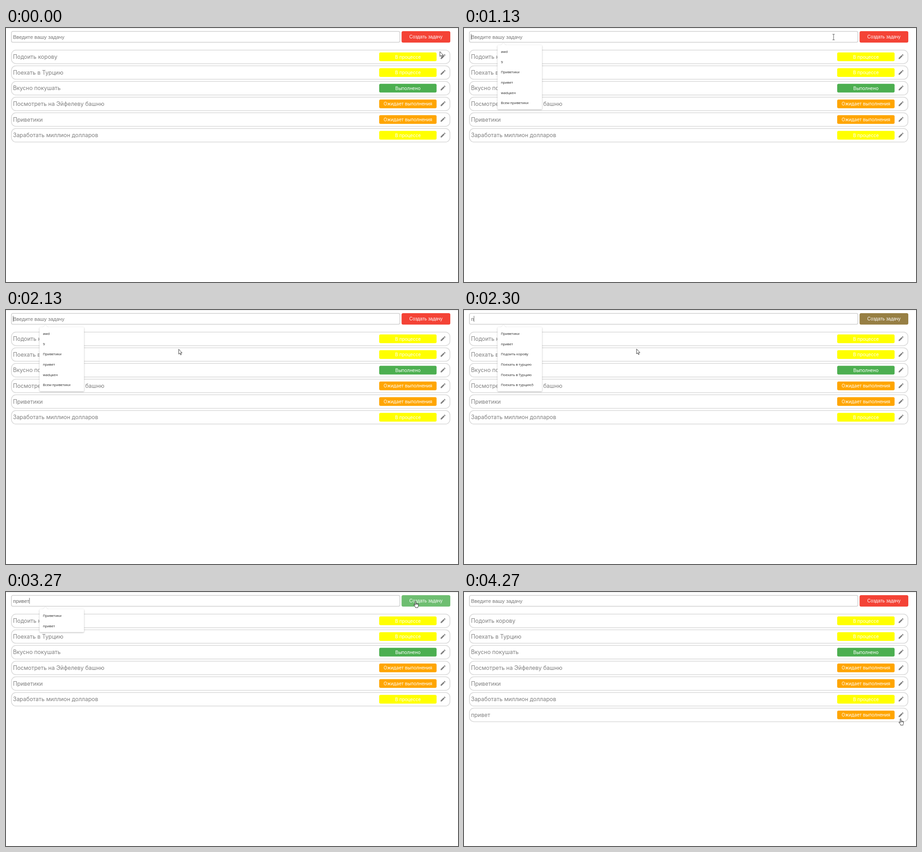
Recreate the animation shown at these times as an HTML page with a canvas. Size 998 px wide and 561 px high, loop 4400 ms.

```html
<!DOCTYPE html>
<html lang="ru">
<head>
<meta charset="utf-8">
<title>Список задач</title>
<style>
html, body { margin: 0; width: 100%; height: 100%; overflow: hidden; background: #fff; }
canvas { display: block; width: 998px; height: 561px; }
</style>
</head>
<body>
<canvas id="stage" width="998" height="561"></canvas>
<script>
const ctx = document.getElementById('stage').getContext('2d');
const LOOP = 4400;
const ARIAL = '"Liberation Sans", Arial, sans-serif';
const INTER = 'Inter, sans-serif';
const POPUP = '"Open Sans", sans-serif';
const RED = [244, 67, 54], GREEN = [76, 175, 80];

const STATUS = {
  progress: ['В процессе', '#ffff00'],
  done: ['Выполнено', '#4caf50'],
  waiting: ['Ожидает выполнения', '#ffa500']
};
const TASKS = [
  ['Подоить корову', 'progress'],
  ['Поехать в Турцию', 'progress'],
  ['Вкусно покушать', 'done'],
  ['Посмотреть на Эйфелеву башню', 'waiting'],
  ['Приветики', 'waiting'],
  ['Заработать миллион долларов', 'progress'],
  ['привет', 'waiting']
];
// Suggestions by number of typed letters; later entries reuse the last list.
const HINTS = [
  ['awd', '9', 'Приветики', 'привет', 'wadцкен', 'Всем приветики'],
  ['Приветики', 'привет', 'Подоить корову', 'Поехать в турцию', 'Поехать в Турцию', 'Поехать в турцию5'],
  ['Приветики', 'привет']
];

const WORD = 'привет';
const KEYS = [2200, 2400, 2530, 2720, 2850, 2980];
const FOCUS = 900, BLUR = 3430, SUBMIT = 3590;

// Pointer stops: time, x, y
const PATH = [
  [0, 958, 52], [280, 896, 98], [560, 829, 44], [630, 829, 41],
  [800, 816, 20], [1400, 816, 20], [1670, 456, 88], [1830, 392, 104],
  [2170, 381, 86], [2350, 381, 86], [2600, 912, 22], [3200, 912, 23],
  [3270, 904, 20], [3430, 904, 20], [3730, 916, 249], [3930, 952, 276],
  [4270, 964, 279.5]
];

const PENCIL = new Path2D('M3 17.25V21h3.75L17.81 9.94l-3.75-3.75zM20.71 7.04a1 1 0 0 0 0-1.41l-2.34-2.34a1 1 0 0 0-1.41 0l-1.83 1.83 3.75 3.75z');
const ARROW = new Path2D('M0 0V16L3.6 12.8 6.2 18.6 8.6 17.5 6.1 12H11Z');
const HAND = new Path2D('M-1.5 14V2a1.5 1.5 0 0 1 3 0V8.3q1.5-1.2 3 .3 1.6-1 2.8.5 2.2-.6 2.2 1.5v4.5q0 2-1.5 4V21.5H0V19.5L-5.3 13.2q-.8-1.8 1-2 1 0 2.8 2.8Z');

const clamp = v => Math.max(0, Math.min(1, v));
const mix = (a, b, k) => a + (b - a) * k;
const smooth = p => p * p * (3 - 2 * p);
const easeOut = p => 1 - (1 - p) ** 2;
const fade = (t, start, length) => easeOut(clamp((t - start) / length));
const rowCenter = i => 63.7 + i * 34.63;

function text(str, x, y, font, color, align = 'left') {
  ctx.font = font;
  ctx.fillStyle = color;
  ctx.textAlign = align;
  ctx.fillText(str, x, y);
}

function box(x, y, w, h, r, fill, stroke) {
  ctx.beginPath();
  ctx.roundRect(x, y, w, h, r);
  if (fill) { ctx.fillStyle = fill; ctx.fill(); }
  if (stroke) { ctx.strokeStyle = stroke; ctx.lineWidth = 1.5; ctx.stroke(); }
}

function drawRow([title, status], i) {
  const cy = rowCenter(i);
  const [label, color] = STATUS[status];
  box(12, cy - 14.9, 968.2, 29.9, 10, null, '#d9d9d9');
  text(title, 15.5, cy + 4.5, '12.4px ' + INTER, '#808080');
  box(824, cy - 9.6, 126.7, 19.2, 3, color);
  text(label, 887.4, cy + 3.8, '10.1px ' + INTER, '#fff', 'center');

  ctx.save();
  ctx.translate(965, cy - 0.5);
  ctx.scale(0.59, 0.59);
  ctx.translate(-12, -12);
  ctx.fillStyle = '#808080';
  ctx.fill(PENCIL);
  ctx.restore();
}

function drawInput(t, typed) {
  const font = '11.4px ' + ARIAL;
  box(12, 7.6, 857.6, 24, 3, '#fff', '#cfcfcf');
  text(typed || 'Введите вашу задачу', 15.5, 23.6, font, typed ? '#6b6b6b' : '#757575');
  const caret = typed || (t >= FOCUS && t < BLUR && (t - FOCUS) % 500 < 250);
  if (caret) {
    ctx.fillStyle = '#444';
    ctx.fillRect(15.5 + (typed ? ctx.measureText(typed).width : 0), 13, 0.8, 13);
  }
}

function drawButton(t) {
  const green = fade(t, KEYS[0], 300) - fade(t, SUBMIT, 300);
  const hover = fade(t, 2540, 120) - fade(t, 3460, 130);
  const rgb = RED.map((c, i) => Math.round(mix(mix(c, GREEN[i], green), 255, hover * 0.19)));
  box(873.4, 7, 107.6, 25.2, 3.5, `rgb(${rgb})`);
  text('Создать задачу', 927.2, 23.1, '10.15px ' + ARIAL, '#fff', 'center');
}

function drawPopup(items) {
  const bottom = 43.4 + items.length * 22.7;
  ctx.save();
  ctx.shadowColor = 'rgba(0,0,0,.3)';
  ctx.shadowBlur = 3;
  ctx.shadowOffsetY = 1;
  ctx.beginPath();
  ctx.roundRect(74, 38, 98.3, bottom - 38, 2);
  ctx.moveTo(81.5, 38.2);
  ctx.lineTo(87, 33);
  ctx.lineTo(92.5, 38.2);
  ctx.fillStyle = '#fff';
  ctx.fill();
  ctx.restore();
  items.forEach((s, i) => text(s, 81.5, 54.9 + i * 22.7, '7.7px ' + POPUP, '#222'));
}

function pointerAt(t) {
  const next = PATH.findIndex(p => p[0] > t);
  if (next < 0) return PATH[PATH.length - 1].slice(1);
  const [t0, x0, y0] = PATH[next - 1], [t1, x1, y1] = PATH[next];
  const k = smooth((t - t0) / (t1 - t0));
  return [mix(x0, x1, k), mix(y0, y1, k)];
}

function drawPointer(x, y, rows) {
  const inBar = y > 7 && y < 32;
  const onPencil = Math.abs(x - 965) < 7 &&
    rows.some((_, i) => Math.abs(y - rowCenter(i)) < 10);
  ctx.save();
  ctx.translate(x, y);
  if (inBar && x < 870) {
    ctx.fillStyle = '#333';
    ctx.fillRect(-0.4, -6, 0.8, 12);
    ctx.fillRect(-2.5, -6.5, 5, 0.8);
    ctx.fillRect(-2.5, 5.7, 5, 0.8);
  } else {
    const shape = onPencil || (inBar && x > 873) ? HAND : ARROW;
    ctx.scale(0.68, 0.68);
    ctx.fillStyle = '#fff';
    ctx.strokeStyle = '#222';
    ctx.lineWidth = 1.3;
    ctx.fill(shape);
    ctx.stroke(shape);
    if (shape === HAND) {
      ctx.beginPath();
      for (const fx of [1.5, 4.5, 7.3]) {
        ctx.moveTo(fx, 8.6);
        ctx.lineTo(fx, 12);
      }
      ctx.stroke();
    }
  }
  ctx.restore();
}

function draw(t) {
  const count = KEYS.filter(k => t >= k).length;
  const typed = t < SUBMIT ? WORD.slice(0, count) : '';
  const rows = t < SUBMIT ? TASKS.slice(0, -1) : TASKS;

  ctx.fillStyle = '#fff';
  ctx.fillRect(0, 0, 998, 561);
  ctx.fillStyle = '#e6e6e6';
  ctx.fillRect(0, 0, 998, 1);
  drawInput(t, typed);
  drawButton(t);
  rows.forEach(drawRow);
  if (t >= FOCUS && t < BLUR) drawPopup(HINTS[Math.min(count, 2)]);
  drawPointer(...pointerAt(t), rows);
}

function tick(now) {
  const t = now % LOOP;
  draw(Math.floor((t + 4) * 0.03) / 0.03);
  requestAnimationFrame(tick);
}
draw(0);
requestAnimationFrame(tick);
</script>
</body>
</html>
```
